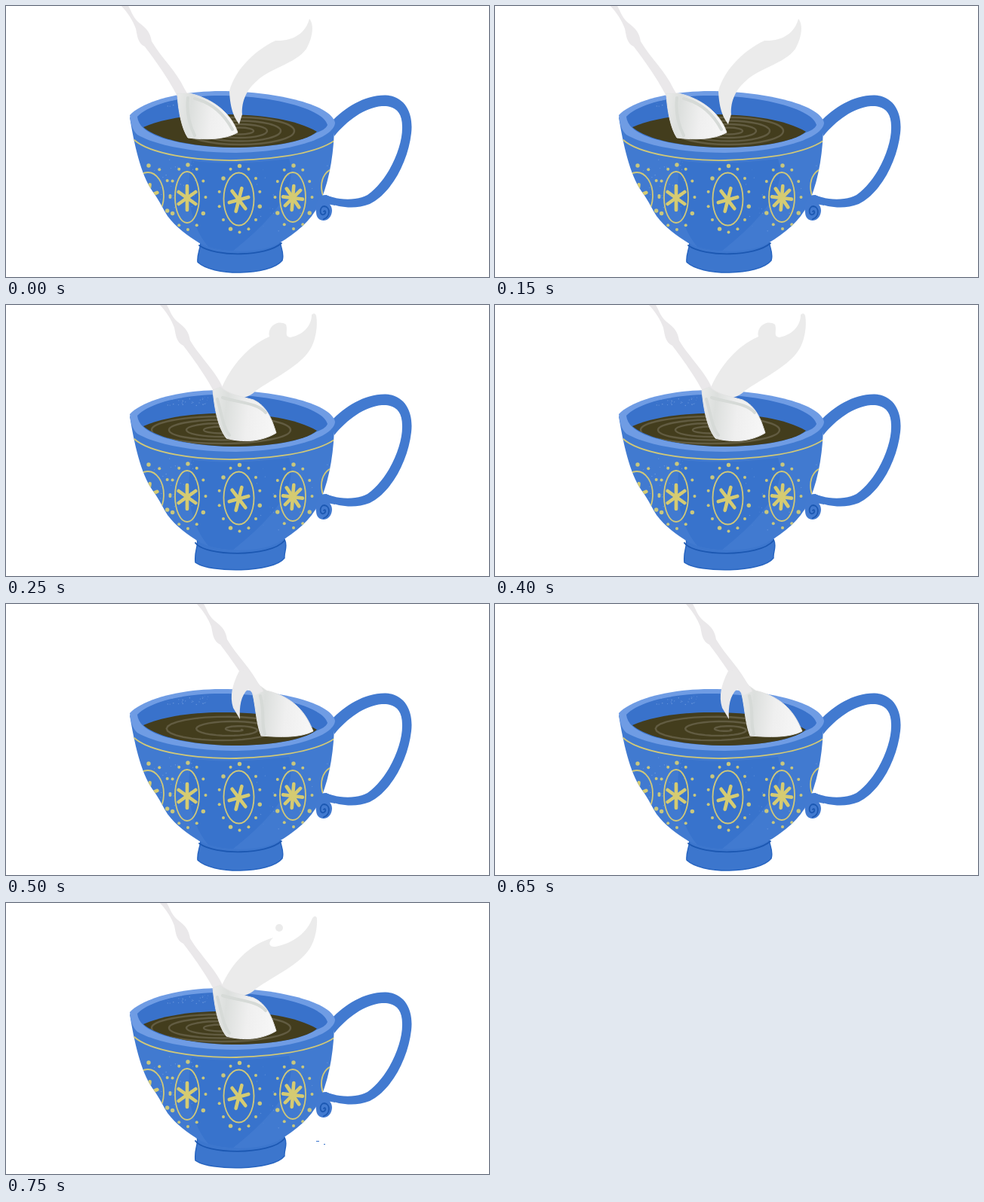
Write an HTML page that moves like this. It is 640x360 px and loops after 1000 ms.

```html
<!DOCTYPE html>
<html lang="en">
<head>
<meta charset="utf-8">
<title>Stirred cup</title>
<style>
html, body { margin: 0; width: 100%; height: 100%; overflow: hidden; background: #fff; }
svg { display: block; width: 100%; height: 100%; }
.line { fill: none; stroke: #d0c878; stroke-width: 1.8; stroke-linecap: round; }
.petal { stroke: #d5cb72; stroke-width: 4.6; stroke-linecap: round; }
.ripple { fill: none; stroke: #625c42; stroke-width: 2.4; stroke-linecap: round; }
.dark { fill: none; stroke: #1c58b2; stroke-width: 1.8; stroke-linecap: round; }
</style>
</head>
<body>
<svg viewBox="0 0 640 360">
  <defs>
    <linearGradient id="bowlFill" x2="1" y2=".1">
      <stop stop-color="#e9eae9"/><stop offset=".25" stop-color="#dcdfdd"/><stop offset=".6" stop-color="#efefef"/><stop offset="1" stop-color="#f6f6f6"/>
    </linearGradient>
    <clipPath id="bodyClip"><path id="bodyShape" d="M164 148C170 184 178 222 194 246C203 258 207 268 214 279C226 295 242 306 258 316C285 329 338 329 362 315C384 302 404 285 414 265C428 237 435 195 435 157Z"/></clipPath>
    <clipPath id="coffeeClip"><path id="coffeeShape" d="M182 161C207 150 245 144 285 144C340 144 385 151 412 167C395 181 350 188 300 188C252 187 204 179 182 161Z"/></clipPath>
  </defs>

  <path fill="#427ad0" d="M431 154C449 135 475 118 503 118.500C530 120 540 144 537 169C533 205 512 248 482 263C462 271 441 267 428 262L424 251C440 258 464 259 479 251C507 231 526 187 525 160C525 140 515 132 498 133C475 135 452 152 435 173Z"/>
  <path id="base" fill="#3c76cd" stroke="#2865c0" stroke-width="1.5"/>
  <use href="#bodyShape" fill="#417ad0"/>
  <g clip-path="url(#bodyClip)">
    <path fill="#3873cc" d="M246 205C290 212 340 207 375 203C390 245 345 290 300 326L270 322C242 292 238 242 246 205Z"/>
    <path class="line" d="M170 178C190 196 250 206 305 205C360 203 410 196 435 179"/>
    <g id="specks" fill="#7ba6e4" opacity=".55"></g>
    <g id="ornaments"></g>
  </g>
  <path id="baseLine" class="dark"/>

  <path fill="#427ad0" d="M424 251C412 251 409 264 411 274C411 289 431 289 432 272C432 263 426 261 421 262L436 265L438 257Z"/>
  <path class="dark" d="M421 273C423 270 425 275 421 277C415 279 415 266 422 266C430 267 430 280 421 283"/>

  <path fill="#6f9ce4" d="M164 145C182 126 232 113 285 113C350 113 430 129 436 155C435 176 375 194 305 195C255 195 202 187 174 171C167 165 165 155 164 145Z"/>
  <path fill="#3972cb" d="M174 147C190 130 235 119 285 119C350 119 421 136 426 158C424 163 418 166 412 168C390 182 350 188 300 188C250 187 200 179 182 162Q175 156 174 147Z"/>
  <use href="#coffeeShape" fill="#433d1d"/>
  <g id="ripples" clip-path="url(#coffeeClip)"></g>
  <g id="wallSpecks" fill="#86ace5" opacity=".6"></g>

  <path id="steam" fill="#ebebeb"/>
  <path id="handle" fill="#eae8ea" d="M151-2L161-2C167 8 168 15 176 22C188 31 191 36 193 47C206 69 226 87 236 109L243 121L230 126C217 98 196 70 184 54C174 49 174 39 172 30C168 19 161 8 151-2Z"/>
  <path id="bowl" fill="url(#bowlFill)" stroke="#e4e4e4"/>
  <path id="shade" fill="none" stroke="#d6dad7" stroke-width="4" stroke-linecap="round"/>
  <path id="drip" fill="#eae9ea"/>
  <circle id="drop" cx="362" cy="33" r="5" fill="#ebebeb"/>
  <path id="flecks" d="M411 316.5h4M421 320.5h2" stroke="#3974cd"/>
</svg>
<script>
const $ = id => document.getElementById(id);
const ellipse = (x, y, rx, ry, cls) => `<ellipse class="${cls}" cx="${x}" cy="${y}" rx="${rx}" ry="${ry}"/>`;

function medallion(x, y, rx, ry, dots, petals, tilt) {
  let out = ellipse(x, y, rx, ry, 'line');
  for (let i = 0; i < petals; i++) {
    const a = i / petals * 2 * Math.PI + tilt;
    out += `<path class="petal" d="M${x} ${y + 1}l${13 * Math.sin(a)} ${-16 * Math.cos(a)}"/>`;
  }
  for (let i = 0; i < dots; i++) {
    const a = i / dots * 2 * Math.PI - Math.PI / 2;
    out += `<circle cx="${x + 1 + (rx + 7.5) * Math.cos(a)}" cy="${y + (ry + 9) * Math.sin(a)}" r="${i % 4 ? 2 : 2.7}" fill="#c9c77d"/>`;
  }
  return out;
}
$('ornaments').innerHTML =
  medallion(188, 252, 21, 31, 12, 6, .2) +
  medallion(240, 254, 16, 34, 12, 6, 0) +
  medallion(308.5, 256.5, 20, 35, 14, 6, .3) +
  medallion(380, 254, 17, 33, 12, 8, .1) +
  ellipse(434, 240, 16, 23, 'line');

let seed = 7;
const rnd = () => (seed = seed * 16807 % 2147483647) / 2147483647;
function scatter(count, x, y, w, h) {
  let out = '';
  for (let i = 0; i < count; i++)
    out += `<circle cx="${x + rnd() * w}" cy="${y + rnd() * h}" r="${.3 + rnd() * .5}"/>`;
  return out;
}
$('specks').innerHTML = scatter(45, 180, 204, 75, 70) + scatter(30, 330, 210, 100, 90);
$('wallSpecks').innerHTML = scatter(35, 208, 122, 60, 12);

const rings = (x, step) => [1, 2, 3, 4].map(n => ellipse(x, 166, n * step, n * 4.5, 'ripple')).join('');
let spiral = 'M312 167';
for (let a = 0; a < 18; a += .2)
  spiral += `L${312 - a * 1.5 + a * 4.8 * Math.cos(a)} ${167 + a * Math.sin(a)}`;

const narrowBase = 'M258 312C258 323 253 329 254 340C272 359 349 359 366 338C369 328 364 322 363 312Z';
const wideBase = 'M253 310C256 320 249 326 251 342C270 356 354 356 369 336C368 328 374 321 369 311L360 306Z';
const narrowLine = 'M256 318C278 334 345 333 365 315';
const wideLine = 'M251 316C263 334 350 336 369 313';

const mid = {
  base: wideBase, baseLine: wideLine, x: 51, ripples: rings(285, 23), drip: '',
  bowl: 'M274 113C276 134 280 162 292 177C313 183 338 182 358 170C352 150 345 134 328 126C310 121 296 119 284 109Z',
  shade: 'M280 125C286 146 288 164 296 173M287 123C310 130 333 130 344 143'
};
const poses = [
  {
    base: narrowBase, baseLine: narrowLine, x: 0, ripples: rings(310, 18),
    steam: 'M296 113C303 86 329 59 357 46C381 47 397 36 402 17C409 25 406 43 398 57C383 77 349 83 333 99C316 113 312 131 313 144L309 157C303 149 297 138 296 113Z',
    bowl: 'M227 116C228 139 233 163 241 175C263 178 290 178 307 168C298 142 274 123 243 116Z',
    shade: 'M241 122C239 141 243 158 250 172M250 123C275 129 291 147 300 164', drip: ''
  },
  { ...mid, steam: 'M285 112C298 81 321 54 349 42C346 28 361 19 371 26C374 34 368 42 377 43C392 40 405 29 405 13Q409 9 411 14C414 30 409 52 401 62C386 83 352 99 331 114C322 124 303 127 288 125Z' },
  {
    base: narrowBase, baseLine: narrowLine, x: 100, ripples: `<path class="ripple" d="${spiral}"/>`, steam: '',
    bowl: 'M325 112C331 132 331 158 338 175C363 177 390 178 407 169C398 146 383 124 345 115L330 104Z',
    shade: 'M337 122C343 145 338 159 343 173',
    drip: 'M309 89C300 107 296 122 301 138L310 153C309 137 311 121 321 113L330 121L341 116C336 104 325 96 321 87Z'
  },
  { ...mid, steam: 'M285 112C298 81 322 55 354 46C346 53 349 59 357 58C382 53 399 39 406 20Q410 15 412 20C413 36 408 54 400 64C386 83 352 99 331 114C322 124 303 127 288 125Z' }
];

let shown = -1;
function frame() {
  const i = Math.floor(performance.now() % 1000 / 250);
  if (i !== shown) {
    const pose = poses[shown = i];
    for (const id of ['base', 'baseLine', 'steam', 'bowl', 'shade', 'drip']) $(id).setAttribute('d', pose[id]);
    $('ripples').innerHTML = pose.ripples;
    $('handle').setAttribute('transform', `translate(${pose.x} 0)`);
    for (const id of ['drop', 'flecks']) $(id).style.display = i === 3 ? '' : 'none';
  }
  requestAnimationFrame(frame);
}
frame();
</script>
</body>
</html>
```
